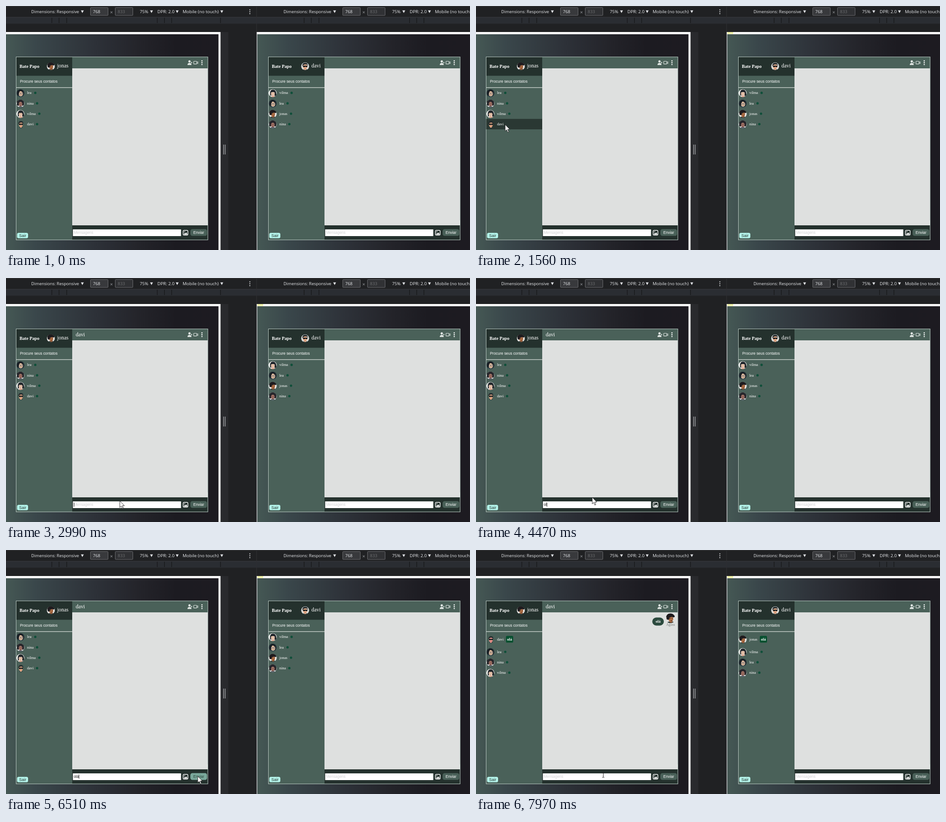
An HTML page for the animation above (8000 ms loop, 1030 px wide and 544 px high).

```html
<!DOCTYPE html>
<html lang="pt">
<head>
<meta charset="utf-8">
<title>Bate Papo</title>
<style>
html, body { margin: 0; width: 100%; height: 100%; overflow: hidden; background: #202124; }
svg { display: block; width: 1030px; height: 544px; }
text { white-space: pre; }
.serif { font-family: "Liberation Serif", Times, serif; }
.sans { font-family: "Liberation Sans", Arial, sans-serif; }
.ui { font-family: "Open Sans", "Noto Sans", sans-serif; }
</style>
</head>
<body>
<svg id="stage" viewBox="0 0 1030 544" xmlns="http://www.w3.org/2000/svg"></svg>
<script>
const LOOP = 8000;
const GREEN = '#4a6159', DARK = '#24312d', WHITE = '#ffffff';

const rect = (x, y, w, h, fill, more = '') =>
  `<rect x="${x}" y="${y}" width="${w}" height="${h}" fill="${fill}" ${more}/>`;
const disc = (x, y, r, fill) => `<circle cx="${x}" cy="${y}" r="${r}" fill="${fill}"/>`;
const oval = (x, y, rx, ry, fill) => `<ellipse cx="${x}" cy="${y}" rx="${rx}" ry="${ry}" fill="${fill}"/>`;
const path = (d, fill, more = '') => `<path d="${d}" fill="${fill}" ${more}/>`;
const text = (x, y, s, size, fill = WHITE, font = 'serif', more = '') =>
  `<text class="${font}" x="${x}" y="${y}" font-size="${size}" fill="${fill}" ${more}>${s}</text>`;
const group = (id, body, more = '') => `<g id="${id}" ${more}>${body}</g>`;
const bold = 'font-weight="700"';

// Avatars, drawn around 0,0 with radius 9
const faces = {
  jonas: () =>
    path('M-8 10Q-6 6 -1 6L4 6Q8 7 9 10Z', '#2d3b39') +
    path('M-2 2L3 2L3.5 8L-1 8Z', '#8a512f') +
    oval(.8, 1.2, 4.5, 5.4, '#b06f45') +
    [[-5, -3], [-4, -6], [-1, -7.5], [3, -7], [5.5, -4.5], [1, -5], [-4.5, 0], [-2, -4]]
      .map(([x, y]) => disc(x, y, 2.7, '#1e1b1e')).join('') +
    path('M-1.5 .2H.6M2.6 .2H4.4M.5 4Q2 5 3.4 4', 'none', 'stroke="#33201a" stroke-width=".8"'),
  davi: (skin = '#eab08a') =>
    path('M-6 10Q-5 6.5 -1 6.5H3Q6 7 7 10Z', '#27363a') +
    rect(-2.2, 2, 4.6, 6, skin) +
    oval(0, .8, 4.8, 6, skin) +
    path('M-6 0Q-7 -8 0 -8Q7 -8 5.6 -1L4 -4Q0 -5 -4 -3Z', '#232a2d') +
    path('M-5.4 -1.6H5.6L4.6 1.8H1.4L.4 0L-.6 1.8H-4Z', '#17191c') +
    path('M-1.5 4.2Q.2 5 2 4.2', 'none', 'stroke="#8b4c43" stroke-width=".8"'),
  lea: () =>
    path('M-8 10Q-6 5.5 0 5.5Q6 6 8 10Z', '#384b50') +
    oval(.8, 1, 4.8, 6, '#e9c3a5') +
    path('M-6.5 4Q-8 -8 0 -8Q8 -7 5.8 0Q4 -4 0 -4.5Q-4 -3 -3.5 4Z', '#171d22') +
    disc(-1.6, .6, 1.7, '#f5ded0') + disc(3, .6, 1.7, '#f5ded0') +
    path('M-3.4 .6A1.8 1.8 0 1 0 .2 .6A1.8 1.8 0 1 0 -3.4 .6M1.2 .6A1.8 1.8 0 1 0 4.8 .6A1.8 1.8 0 1 0 1.2 .6M.2 .6H1.2M-.4 4.3H2.2',
      'none', 'stroke="#38302f" stroke-width=".7"'),
  nina: () =>
    path('M-7 10Q-5 6 0 6Q6 6 7 10Z', '#4b5560') +
    [[-5, -1], [-5, -4], [-2, -6.4], [2, -6.4], [5, -4], [5.6, -.6], [-5, 2], [5, 2], [0, -4]]
      .map(([x, y]) => disc(x, y, 2.9, '#26262b')).join('') +
    oval(.3, 1.4, 4, 5.2, '#a07064') +
    path('M-2.2 .4H-.5M1.3 .4H3M-1 4.2Q.5 5 2 4.2', 'none', 'stroke="#3a2625" stroke-width=".8"'),
  vilma: () =>
    path('M-4 10Q-3 6 1 6Q6 6 8 10Z', '#dca08a') +
    path('M-5.5 5Q-7.5 -8 1 -8Q9 -7 8 6L4 6L4 0L-4 6Z', '#20262b') +
    oval(.4, 1.2, 4.2, 5.6, '#f0cbb2') +
    path('M-4.4 0Q-5 -6 1 -6Q6 -5 5.4 1L4 -2.2L-3 -2.2Z', '#20262b') +
    path('M-2.2 .6H-.6M1.6 .6H3.2M-.8 4.4H1.6', 'none', 'stroke="#503533" stroke-width=".7"')
};
const backs = { jonas: '#e8e8e6', davi: '#d8dcda', lea: '#27333a', nina: '#f2f2f2', vilma: '#f4f4f2' };
const avatar = (name, x, y, { back = backs[name], scale = 1, skin } = {}) =>
  `<g transform="translate(${x} ${y}) scale(${scale})" clip-path="url(#round)">` +
  (back ? disc(0, 0, 9, back) : '') + faces[name](skin) + '</g>';

// Contact rows; dot offsets follow the name widths
const dotX = { jonas: 72.7, davi: 69, lea: 65, nina: 69, vilma: 74 };
const contact = (name, y, note) => {
  const plain = name === 'davi';
  const face = avatar(name, plain ? 33 : 32, y + .5,
    { back: plain ? '' : backs[name], scale: plain ? .9 : 1, skin: note && '#f0968f' });
  const bx = name === 'jonas' ? 70 : 66.5;
  const tail = note
    ? rect(bx, y - 7.5, 16, 15, '#06502f', 'rx="2.5"') + text(bx + 2.6, y + 2.6, 'olá', 8.5, WHITE, 'serif', bold)
    : `<g class="dot-${name}">${disc(dotX[name], y, 2.6, '#0f4f39')}</g>`;
  return face + text(46.7, y + 2.6, name, 8.5) + tail;
};
const plainList = names => names.map((n, i) => contact(n, 193.7 + i * 23.2)).join('');
const newList = (first, rest) => contact(first, 199, true) +
  rest.map((n, i) => contact(n, 227 + i * 23.2)).join('');

const arrowDown = x => path(`M${x - 3.2} 9.8H${x + 3.2}L${x} 15.8Z`, '#dfe1e5');

function toolbar() {
  const field = (x, s, fill, ink) =>
    rect(x + .5, 3.5, 39, 17.5, fill, 'stroke="#6c6d70" rx="1"') + text(x + 6, 16.3, s, 9.5, ink, 'ui');
  const ink = '#e8eaed';
  return text(56, 16.3, 'Dimensions: Responsive', 9.4, ink, 'ui') + arrowDown(169.5) +
    field(187, '768', '#38393c', ink) + text(231, 18, '×', 11, '#9a9da1', 'ui') +
    field(242, '833', '#303134', '#6f7173') +
    text(297, 16.3, '75%', 9.6, ink, 'ui') + arrowDown(323) +
    text(336, 16.3, 'DPR: 2.0', 9.8, ink, 'ui') + arrowDown(380) +
    text(392, 16.3, 'Mobile (no touch)', 9.8, ink, 'ui') + arrowDown(479);
}

function chat(user, userX) {
  const light = '#e3e9e6';
  return rect(22, 113, 426.5, 409, GREEN) +
    rect(22, 113, 125, 42.5, DARK) +
    rect(147, 139, 301, 350, '#dee0df') + rect(147, 489, 301, 32, DARK) +
    rect(22, 181.3, 125, 1.2, light) +
    rect(446.8, 478, 1.2, 11, WHITE) +
    text(30, 138, 'Bate Papo', 10.1, WHITE, 'serif', bold) +
    avatar(user, userX, 134.5) + text(userX + 14, 137.3, user, 11.9) +
    text(31, 171.3, 'Procure seus contatos', 8.4, WHITE, 'sans') +
    disc(407.3, 123.6, 2.5, light) + path('M402.8 131.5Q403 127 407.3 127Q411.6 127 411.8 131.5Z', light) +
    path('M410.2 126.2H413.6M411.9 124.5V127.9', 'none', `stroke="${light}"`) +
    rect(416.6, 123.2, 6.8, 6.2, 'none', `rx="1" stroke="${light}" stroke-width="1.1"`) +
    path('M423.6 125.8L426 124V128.8L423.6 127', 'none', `stroke="${light}"`) +
    [122.3, 126.4, 130.5].map(y => disc(435, y, 1.35, WHITE)).join('') +
    rect(148.5, 498, 240, 15, WHITE) +
    rect(393.3, 500.3, 10.4, 10.4, DARK, 'rx="1.8" stroke="#fff" stroke-width="1.4"') +
    path('M394.5 509.5L397 505.6L398.7 507.6L400.4 504.6L402.8 509.5Z', WHITE) + disc(396.3, 503.2, 1, WHITE) +
    rect(24.5, 505.7, 24.5, 12, '#b4f4ea', 'rx="3.5"') + text(28.9, 514.8, 'Sair', 9, DARK, 'sans') +
    rect(22.5, 113.5, 425.5, 408, 'none', 'stroke="#b9c9c2"');
}
const hint = () => text(150.4, 508.4, 'Mensagens', 8.4, '#d0d2d3', 'sans');
const sendButton = (fill, ink) =>
  rect(409.3, 497.4, 37, 15.2, fill, 'rx="4.5"') + text(415.8, 508.1, 'Enviar', 8.5, ink, 'sans');

const ticks = [101, 117, 134, 335, 351, 367];
const ruler = (dx, list) => list.map(x => rect(x + dx, 26, 1.3, 12, '#17181a')).join('');
const page = (x, w) => rect(x, 63, w, 481, 'url(#night)');

document.getElementById('stage').innerHTML = `
<defs>
  <clipPath id="round"><circle r="9"/></clipPath>
  <linearGradient id="night">
    <stop offset="0" stop-color="#455854"/><stop offset=".14" stop-color="#3a474b"/>
    <stop offset=".42" stop-color="#2d3138"/><stop offset=".64" stop-color="#232329"/>
    <stop offset=".8" stop-color="#1c1b21"/><stop offset="1" stop-color="#1d1b21"/>
  </linearGradient>
</defs>` +
rect(0, 0, 1030, 544, '#202123') + rect(0, 0, 1030, 1, '#38393c') +
rect(0, 25, 1030, 14.5, '#2a2d32') + rect(0, 24.5, 1030, 1, '#3a3c40') +
ruler(0, [...ticks, 475.5]) + ruler(560, ticks) +
rect(555.7, 0, 1.2, 544, '#2e2f32') +
toolbar() + [8.5, 12.8, 17.1].map(y => disc(541.3, y, 1.3, '#b4b6b9')).join('') +
`<g transform="translate(560 0)">${toolbar()}</g>` +
rect(0, 58, 476.5, 486, WHITE) + page(0, 471.7) +
rect(476.5, 58, 17, 486, '#292a2d') +
rect(482.3, 309, 1.5, 22, '#a0a2a5') + rect(485.8, 309, 1.5, 22, '#a0a2a5') +
rect(556.5, 58, 474, 5, WHITE) + rect(556.5, 63, 1.6, 481, '#c3c6c7') + page(558, 472) +
group('strip', rect(558, 58, 13, 4.5, '#eef0a6')) +
chat('jonas', 99.5) +
group('row', rect(22.5, 251.7, 124.5, 23.3, '#2a3833')) +
group('listA', plainList(['lea', 'nina', 'vilma', 'davi'])) +
group('listB', plainList(['lea', 'nina', 'vilma']) + contact('davi', 268, true)) +
group('listC', newList('davi', ['lea', 'nina', 'vilma'])) +
group('title', text(154.7, 130, 'davi', 11.9)) +
group('bubble', rect(391.3, 150.6, 25.7, 17.8, '#2b4a3e', 'rx="8.9"') +
  text(398.8, 162, 'olá', 8.5, WHITE, 'serif', bold) + text(422.2, 169, 'Agora', 7.6, '#777b79')) +
group('photo', avatar('jonas', 431.5, 152.3, { back: '', scale: 1.2 })) +
group('hint', hint()) +
text(150.4, 508.4, '', 8.4, '#1c1c1c', 'sans', 'id="typed"') +
group('caret', rect(0, 500.5, .9, 9.5, '#111')) +
sendButton(GREEN, WHITE) + group('hot', sendButton('#7aa89b', '#27443a')) +
`<g transform="translate(560 0)">` + chat('davi', 104) +
group('peerA', plainList(['vilma', 'lea', 'jonas', 'nina'])) +
group('peerB', newList('jonas', ['vilma', 'lea', 'nina'])) +
hint() + sendButton(GREEN, WHITE) + '</g>' +
group('mouse',
  group('arrow', path('M0 0V14.6L3.3 11.5L5.7 17.2L8 16.2L5.6 10.7H10.2Z', WHITE,
    'stroke="#1c1c1c" stroke-width=".9" stroke-linejoin="round"')) +
  group('beam', path('M-2.4 -5.5H-.6L0 -5L.6 -5.5H2.4M0 -5V5M-2.4 5.5H-.6L0 5L.6 5.5H2.4', 'none', 'stroke="#222"')));

// Bursts of screen updates: start, end, count
const bursts = [[0, 0, 1], [240, 1000, 12], [1070, 1700, 10], [1840, 2590, 12], [2660, 2660, 1],
  [2860, 3130, 4], [3340, 3340, 1], [3870, 3870, 1], [4200, 4200, 1], [4470, 4470, 1],
  [4930, 5060, 2], [5530, 6300, 12], [6370, 7140, 12], [7210, 7970, 11]];
function snap(t) {
  const [a, b, n] = bursts.filter(s => s[0] <= t).pop();
  if (t >= b) return b;
  const step = (b - a) / (n - 1);
  return a + Math.floor((t - a) / step) * step;
}

// Pointer path: time, x, y
const track = [[240, 893, 534], [420, 760, 500], [640, 385, 395], [860, 125, 314], [1000, 73, 297],
  [1070, 70.5, 290], [1350, 66, 268], [1700, 64, 262], [1840, 65, 263], [1930, 82, 274],
  [2110, 154, 324], [2350, 218, 430], [2590, 249, 501], [2660, 248.5, 501], [2860, 250, 501],
  [3130, 258, 489], [5460, 258, 489], [5950, 311, 459], [6090, 345, 446], [6300, 424, 501],
  [6370, 426, 504], [6850, 425, 505], [7000, 390, 501], [7140, 352, 502], [7400, 312, 502], [7970, 282.5, 501.5]];
function pointer(t) {
  const i = track.findIndex(k => k[0] > t);
  if (i < 0) return track[track.length - 1].slice(1);
  const [a, b] = [track[Math.max(i - 1, 0)], track[i]];
  const f = Math.max(0, (t - a[0]) / (b[0] - a[0]));
  return [a[1] + (b[1] - a[1]) * f, a[2] + (b[2] - a[2]) * f];
}

const $ = id => document.getElementById(id);
const show = (id, on) => { $(id).style.display = on ? '' : 'none'; };
const within = (t, ...spans) => spans.some(([a, b]) => t >= a && t < b);
const fade = (t, a, b, c, d) => Math.max(0, Math.min(1, (t - a) / (b - a), (d - t) / (d - c)));
const typing = [[4200, 'o', 155.1], [4470, 'ol', 157], [5060, 'olá', 161.6], [7140, '', 150.6]];

function draw(now) {
  const t = snap(now);
  const [x, y] = pointer(t);
  const inField = x > 149 && x < 388 && y > 497 && y < 513;
  show('mouse', t >= 240);
  $('mouse').setAttribute('transform', `translate(${x.toFixed(2)} ${y.toFixed(2)})`);
  show('arrow', !inField);
  show('beam', inField);

  show('strip', t >= 1280);
  const glow = fade(t, 1200, 1340, 2130, 2330);
  $('row').style.opacity = glow;
  document.querySelector('#listA .dot-davi').style.opacity = 1 - glow;
  show('title', t >= 1840);

  const [, word, caretX] = typing.filter(k => k[0] <= t).pop() || [0, '', 150.6];
  $('typed').textContent = word;
  show('hint', !word);
  show('caret', within(t, [2860, 3340], [3870, 4930], [5060, 5530], [6060, 6560]));
  $('caret').setAttribute('transform', `translate(${caretX} 0)`);

  $('hot').style.opacity = fade(t, 6290, 6440, 7005, 7140);
  const sent = t >= 6780, sorted = t >= 7130, arrived = t >= 7280;
  show('listA', !sent);
  show('listB', sent && !sorted);
  show('listC', sorted);
  show('bubble', sent);
  show('photo', arrived);
  show('peerA', !arrived);
  show('peerB', arrived);
}

const start = performance.now();
function tick() {
  draw((performance.now() - start) % LOOP);
  requestAnimationFrame(tick);
}
tick();
</script>
</body>
</html>
```
